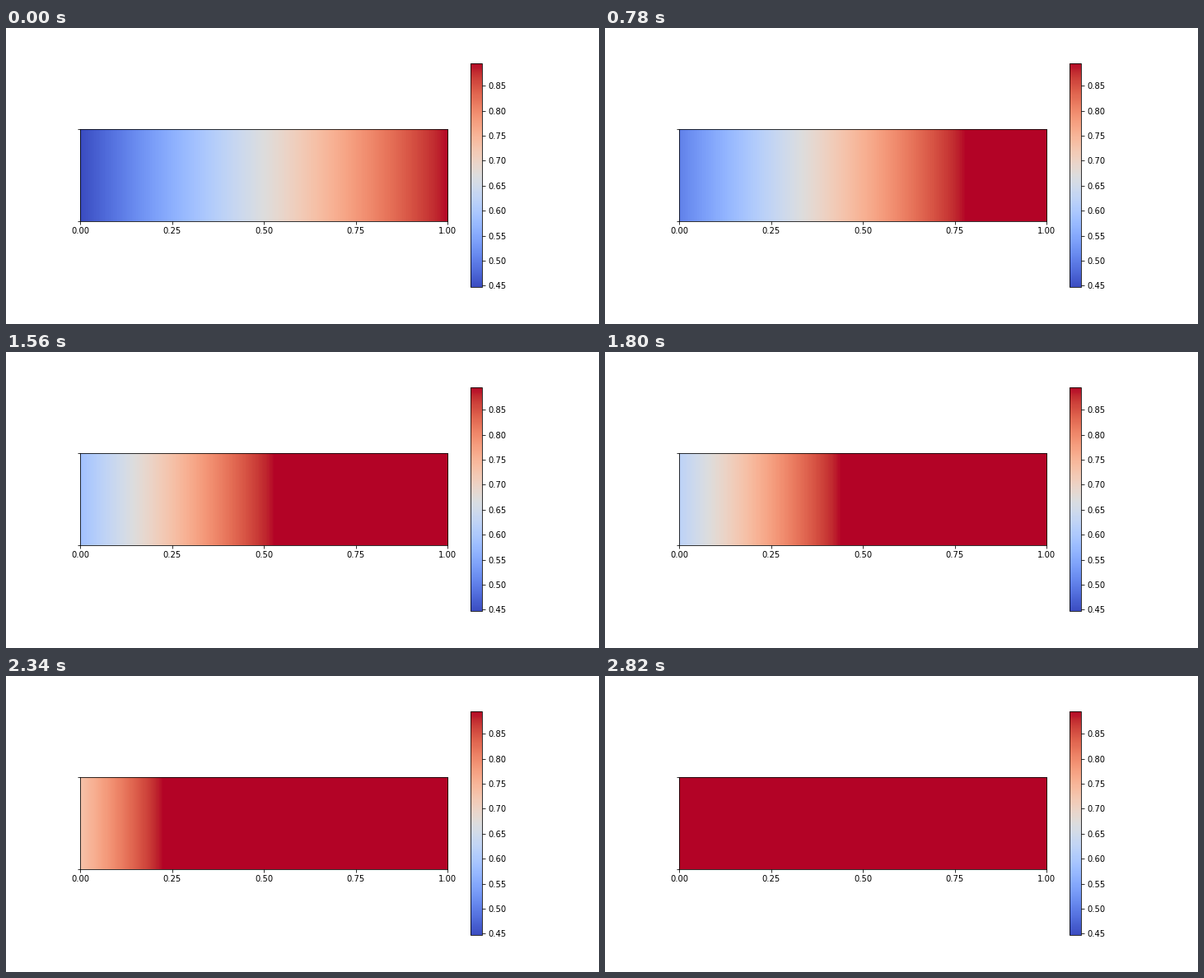
Write a matplotlib script that moves like this. It is 720 px wide and 360 px high and loops after 3 s.

```python
import numpy as np
import matplotlib.pyplot as plt
from matplotlib.animation import FuncAnimation

FRAMES, INTERVAL = 50, 60
COLUMNS = 446

plt.rcParams.update({
    "font.family": "DejaVu Sans",
    "font.size": 10,
    "figure.subplot.bottom": 0.125,
})

x = (np.arange(COLUMNS) + 0.5) / COLUMNS


def field(frame):
    """Steepening ramp, one row of values along x."""
    t = frame / FRAMES
    return ((1 + x) / np.sqrt(5 - 4 * t))[np.newaxis, :]


fig, ax = plt.subplots(figsize=(10, 5), dpi=72)
image = ax.imshow(
    field(0), cmap="coolwarm", vmin=1 / np.sqrt(5), vmax=2 / np.sqrt(5),
    extent=(0, 1, 0, 0.25), aspect="equal", interpolation="nearest",
)
ax.set_xticks(np.linspace(0, 1, 5))
ax.xaxis.set_major_formatter("{x:.2f}")
ax.set_yticks([0, 0.25], labels=["", ""])

bar = fig.colorbar(image, ax=ax)
bar.set_ticks(np.arange(0.45, 0.88, 0.05))
bar.ax.yaxis.set_major_formatter("{x:.2f}")


def update(frame):
    image.set_data(field(frame))
    return (image,)


anim = FuncAnimation(fig, update, frames=FRAMES, interval=INTERVAL,
                     repeat=True, repeat_delay=0, blit=False)
plt.show()
```
